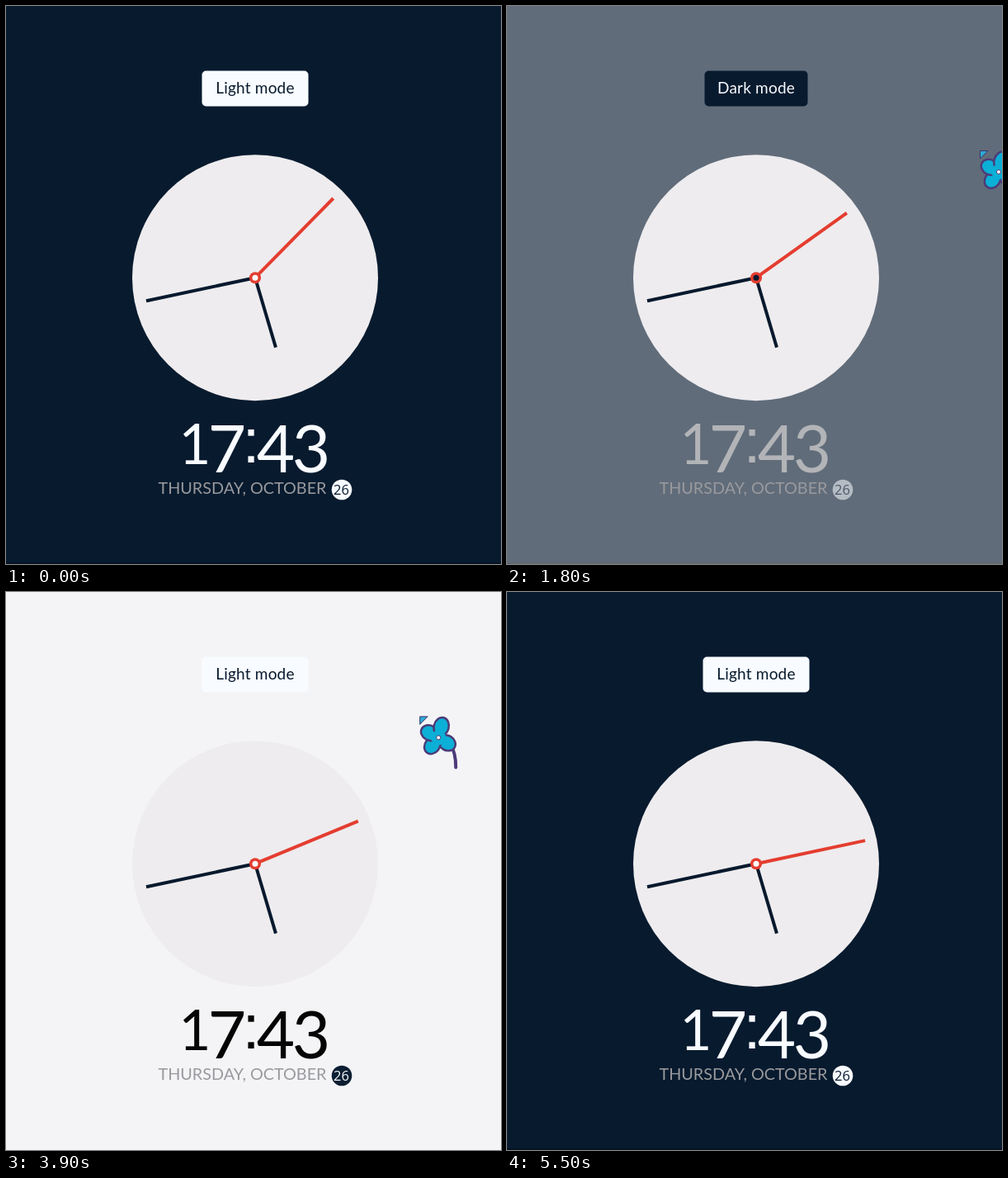
An HTML page for the animation above (5.6 s loop, 600 px wide and 676 px high).

```html
<!DOCTYPE html>
<html lang="en">
<head>
<meta charset="utf-8">
<title>Clock</title>
<style>
  html, body { margin: 0; width: 100%; height: 100%; overflow: hidden; }
  svg { display: block; font-family: Lato, sans-serif; text-anchor: middle; }
  .hand { stroke-width: 4; stroke: #07192d; }
  .petal { fill: #0cafd6; stroke: #4c3b78; stroke-width: 2.5; }
</style>
</head>
<body>
<svg width="600" height="676" viewBox="0 0 600 676">
  <rect id="page" width="600" height="676"/>
  <rect id="edge" y="674" width="600" height="2"/>

  <rect id="button" y="78.5" height="43" rx="5"/>
  <text id="label" x="302" y="106" font-size="19" letter-spacing=".2"></text>

  <circle cx="302" cy="329.2" r="149" fill="#eeecee"/>
  <g transform="translate(302 329.2)">
    <path class="hand" d="M0 0V-88" transform="rotate(163.5)"/>
    <path class="hand" d="M0 0V-135" transform="rotate(258)"/>
    <path id="second" class="hand" d="M0 0V-135" style="stroke:#e43d30"/>
    <circle r="7" fill="#e43d30"/>
    <circle id="hub" r="3.5"/>
  </g>

  <text id="time" font-size="80"><tspan x="229" y="555" font-size="67">1</tspan><tspan x="268" y="565">7</tspan><tspan x="297" y="553" font-size="76" font-family="Liberation Sans, sans-serif">:</tspan><tspan x="327" y="565">4</tspan><tspan x="370" y="565">3</tspan></text>
  <text x="286.5" y="591" font-size="19.8" fill="#999a9e">THURSDAY, OCTOBER</text>
  <circle id="badge" cx="407" cy="586" r="12.3"/>
  <text id="day" x="406.5" y="592" font-size="16.5" font-family="Open Sans, sans-serif">26</text>

  <g id="cursor">
    <g id="flower">
      <path d="M38 36Q44 44 44 62" fill="none" stroke="#4c3b78" stroke-width="4" stroke-linecap="round"/>
      <g transform="translate(23 26)">
        <ellipse class="petal" cy="-12" rx="9" ry="11" transform="rotate(122)"/>
        <ellipse class="petal" cy="-12" rx="9" ry="11" transform="rotate(-142)"/>
        <ellipse class="petal" cy="-12" rx="9" ry="11" transform="rotate(-62)"/>
        <ellipse class="petal" cy="-13.5" rx="9" ry="11.5" transform="rotate(15)"/>
        <circle r="9" fill="#0cafd6"/>
        <circle r="2.5" fill="#fff" stroke="#4c3b78"/>
      </g>
    </g>
    <ellipse id="figure" cx="23" cy="34" rx="17" ry="32" fill="#eee2ef" transform="rotate(-18 23 34)"/>
    <path d="M.5 .5H10L.5 10Z" fill="#2fa9d8" stroke="#3b3566"/>
  </g>
</svg>
<script>
const LOOP = 5600, FADE = 500, TO_LIGHT = 1500, TO_DARK = 3800;
const TICK = 993, TICK_START = -325;
const NAVY = [8, 26, 46], SNOW = [248, 251, 255], WHITE = [254, 253, 255];
const BLACK = [0, 0, 0], EDGE = [4, 18, 33];

// Each stop: time, x, y
const visits = [
  [[600, 620, 190], [900, 390, 122], [1050, 390, 122], [1300, 332, 98],
   [1550, 332, 98], [1850, 620, 190]],
  [[3000, 620, 175], [3200, 485, 132], [3300, 376, 114], [3450, 332, 100],
   [3750, 332, 100], [3850, 440, 130], [4000, 620, 190]]
];

const $ = id => document.getElementById(id);
const clamp = v => Math.min(1, Math.max(0, v));
const lerp = (a, b, k) => a + (b - a) * k;
const mix = (a, b, k) => a.map((v, i) => Math.round(lerp(v, b[i], k)));
const fill = (id, color) => $(id).setAttribute("fill", `rgb(${color})`);

function cursorAt(t) {
  for (const stops of visits)
    for (let i = 1; i < stops.length; i++) {
      const [t0, x0, y0] = stops[i - 1], [t1, x1, y1] = stops[i];
      if (t >= t0 && t < t1) {
        const k = (t - t0) / (t1 - t0);
        return [lerp(x0, x1, k), lerp(y0, y1, k)];
      }
    }
  return null;
}

function drawTheme(t) {
  const light = t >= TO_LIGHT && t < TO_DARK;
  const progress = clamp((t - TO_LIGHT) / FADE);
  const back = clamp((t - TO_DARK) / FADE);
  const lightness = power => t < TO_DARK ? progress ** power : 1 - back ** power;
  const page = lightness(2), ink = lightness(2.5);

  fill("page", mix(NAVY, WHITE, page));
  fill("edge", mix(EDGE, WHITE, page));
  fill("time", mix(SNOW, BLACK, ink));
  fill("badge", mix(SNOW, NAVY, ink));
  fill("day", mix(NAVY, SNOW, ink));

  // The button and hub switch at once
  $("button").setAttribute("x", light ? 239.5 : 237.5);
  $("button").setAttribute("width", light ? 125 : 129);
  $("label").textContent = light ? "Dark mode" : "Light mode";
  fill("button", light ? NAVY : SNOW);
  fill("label", light ? SNOW : NAVY);
  fill("hub", light ? NAVY : SNOW);
}

function drawSecond(t) {
  const ticks = (t - TICK_START) / TICK;
  const whole = Math.floor(ticks);
  const turn = clamp((ticks - whole) * TICK / FADE) ** 2;
  $("second").setAttribute("transform", `rotate(${42 + 6 * (whole + turn)})`);
}

function drawCursor(t) {
  const spot = cursorAt(t);
  $("cursor").style.display = spot ? "" : "none";
  if (!spot) return;
  const [x, y] = spot;
  const over = x > 238 && x < 366 && y > 79 && y < 121;
  $("cursor").setAttribute("transform", `translate(${x} ${y})`);
  $("flower").style.display = over ? "none" : "";
  $("figure").style.display = over ? "" : "none";
}

const start = performance.now();
function frame() {
  const t = (performance.now() - start) % LOOP;
  drawTheme(t);
  drawSecond(t);
  drawCursor(t);
  requestAnimationFrame(frame);
}
frame();
</script>
</body>
</html>
```
